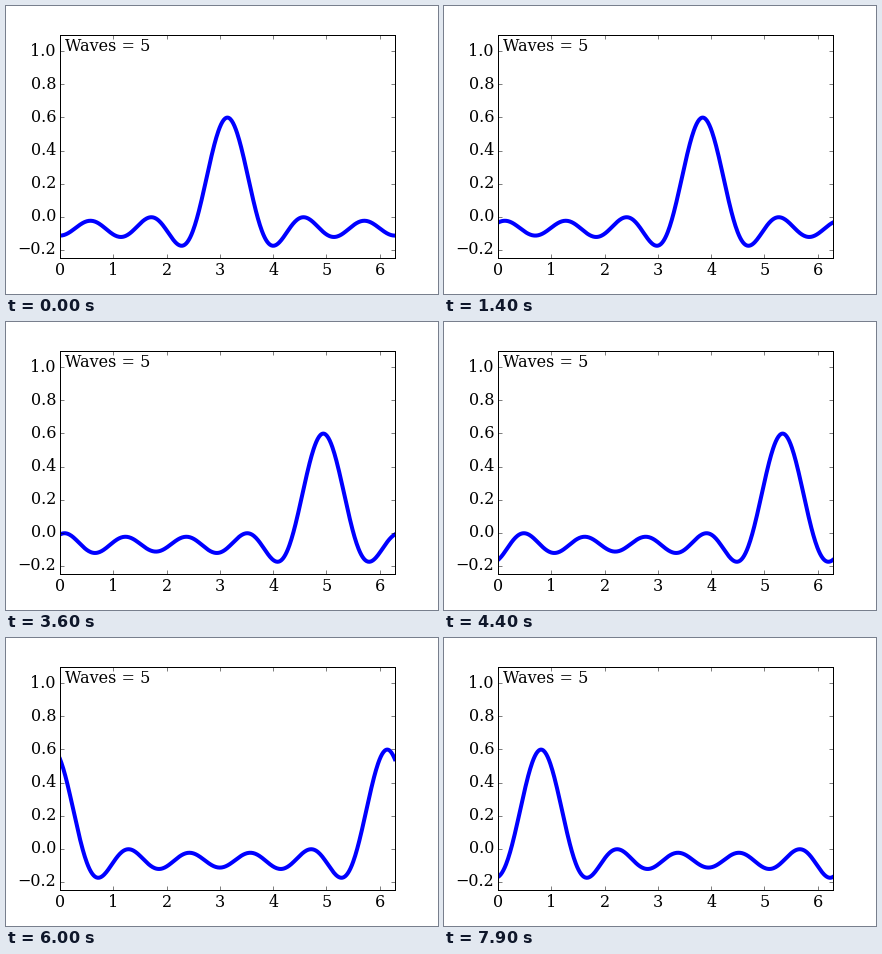
A matplotlib script for the animation above (8000 ms loop, 432 by 288 pixels).

```python
import numpy as np
import matplotlib.pyplot as plt
from matplotlib.animation import FuncAnimation

plt.style.use("classic")
plt.rcParams.update({
    "font.family": "DejaVu Serif",
    "font.size": 16,
    "xtick.labelsize": 16,
    "ytick.labelsize": 16,
    "savefig.dpi": "figure",
})

WAVES = 5
FRAMES = 80
STEP = 0.05  # phase shift per frame
SHARPNESS = 16  # pulse is exp(-SHARPNESS * x**2)

k = np.arange(1, WAVES + 1)
coeffs = np.exp(-k**2 / (4 * SHARPNESS)) / np.sqrt(np.pi * SHARPNESS)
x = np.linspace(0, 2 * np.pi, 500)


def pulse(shift):
    """Truncated Fourier series of a periodic Gaussian, without its mean."""
    return coeffs @ np.cos(np.outer(k, x - np.pi - shift))


fig = plt.figure(figsize=(6, 4), dpi=72, facecolor="white")
ax = fig.add_axes([0.125, 0.125, 0.775, 0.775])
ax.set_xlim(0, 2 * np.pi)
ax.set_ylim(-0.25, 1.1)
ax.set_xticks(range(7))
ax.set_yticks(np.arange(-1, 6) * 0.2)
ax.text(0.1, 1.0, f"Waves = {WAVES}")
line, = ax.plot(x, pulse(0), color="blue", lw=4)


def update(i):
    line.set_ydata(pulse(i * STEP))
    return line,


anim = FuncAnimation(fig, update, frames=FRAMES, interval=100,
                     repeat=True, repeat_delay=0)
plt.show()
```
